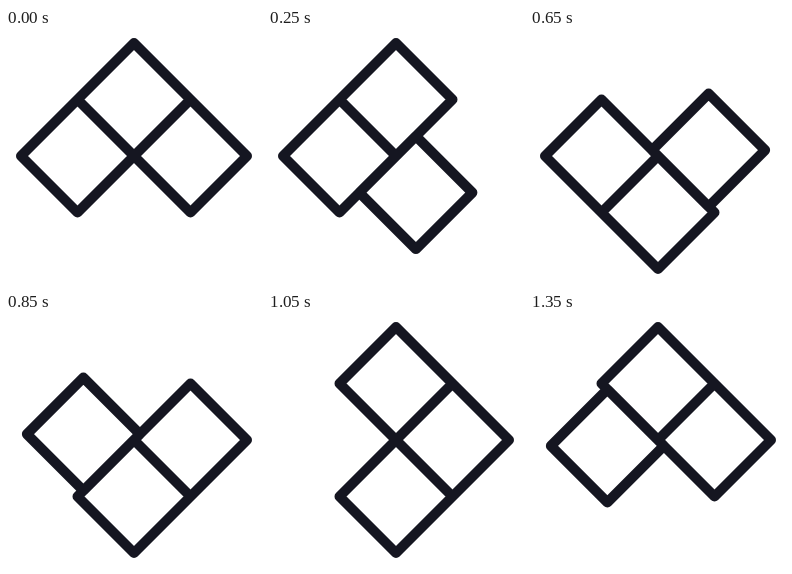
Animation, 256 px wide and 256 px high, one loop 1400 ms. Source, as an HTML page:

```html
<!DOCTYPE html>
<html lang="en">
<head>
<meta charset="utf-8">
<title>Sliding squares</title>
<style>
  html, body { margin: 0; width: 100%; height: 100%; overflow: hidden; background: #fff; }
  svg { display: block; width: 100%; height: 100%; }
  path { fill: none; stroke: #151621; stroke-width: 10; stroke-linejoin: round; }
</style>
</head>
<body>
<svg viewBox="0 0 256 256"><path id="squares"/></svg>
<script>
const LOOP = 1400, TURN = 350, WAIT = 100, SLIDE = 250, STEP = 50;
const MID = 128, R = 56.5;
const squares = document.getElementById('squares');

// Cell centres, clockwise: top, right, bottom, left
const cells = [[MID, MID - R], [MID + R, MID], [MID, MID + R], [MID - R, MID]];
const cell = i => cells[(i + 4) % 4];

const smooth = x => x * x * (3 - 2 * x);
const diamond = ([x, y]) => `M${x} ${y - R}l${R} ${R} ${-R} ${R} ${-R} ${-R}z`;

// Each turn one square slides clockwise into the empty cell.
function draw(ms) {
  const t = Math.floor((ms + 0.5) / STEP) * STEP % LOOP;
  const turn = Math.floor(t / TURN);
  const p = smooth(Math.max(0, (t % TURN - WAIT) / SLIDE));
  const gap = 2 - turn;
  const from = cell(gap - 1), to = cell(gap);
  const moving = from.map((v, k) => v + (to[k] - v) * p);
  squares.setAttribute('d', [moving, cell(gap + 1), cell(gap + 2)].map(diamond).join(''));
}

function tick() {
  draw(performance.now());
  requestAnimationFrame(tick);
}
tick();
</script>
</body>
</html>
```
